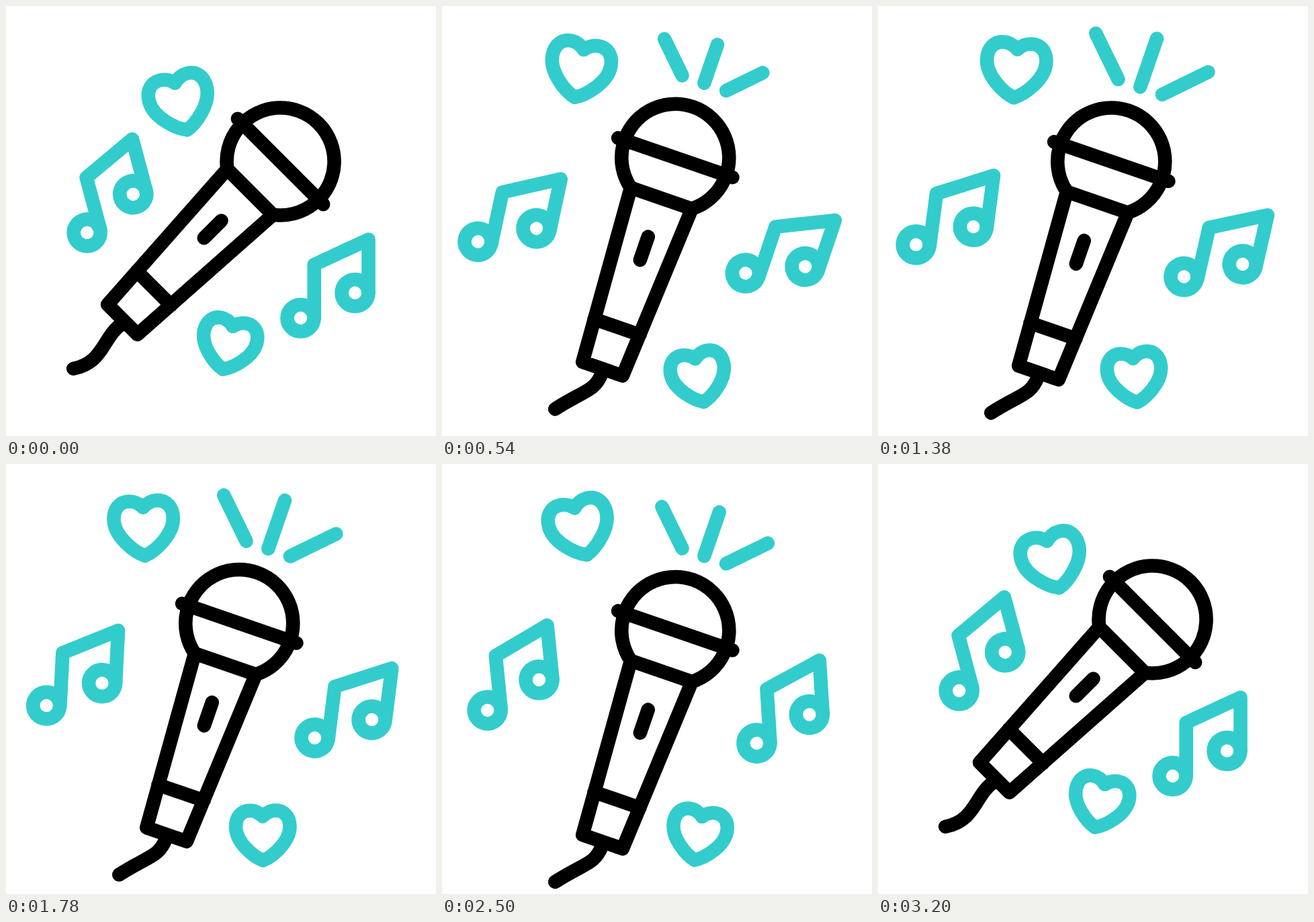
Recreate the animation shown at these times as an HTML page. Size 640 by 640 pixels, loop 3.4 s.

```html
<!DOCTYPE html>
<html lang="en">
<head>
<meta charset="utf-8">
<title>Singing microphone</title>
<style>
html, body { margin: 0; width: 100%; height: 100%; overflow: hidden; background: #fff; }
svg { display: block; width: 100vw; height: 100vh; fill: none; stroke: #3cc; stroke-width: 20.6; stroke-linecap: round; stroke-linejoin: round; }
#heartB { stroke-width: 22.6; }
</style>
</head>
<body>
<svg viewBox="0 0 640 640">
  <defs>
    <g id="note">
      <circle cx="-40.5" cy="48.5" r="20"/>
      <circle cx="40.5" cy="11" r="20"/>
      <path d="M-20.3 48.5V-31L60.5 -68.5V11"/>
    </g>
    <path id="half" d="M0 -31C-7 -38 -15 -40.5 -21 -40.5C-35 -40.5 -44.2 -30 -44.2 -14C-44.2 12 -14 36 0 41"/>
    <g id="heart"><use href="#half"/><use href="#half" transform="scale(-1 1)"/></g>
  </defs>
  <g id="noteL"><use href="#note" x="-8"/></g>
  <g id="noteR"><use href="#note"/></g>
  <g id="heartT"><use href="#heart"/></g>
  <g id="heartB"><use href="#heart" transform="scale(.91)"/></g>
  <g id="mic">
    <g transform="translate(0 -125.2)">
      <path id="rays"/>
      <g stroke="#000">
        <path id="cord"/>
        <path d="M-48 64A80 80 0 1 1 48 64L31.5 332.5H-31.5ZH48M-90 0H90M-36 266.5H36M0 124.5V161"/>
      </g>
    </g>
  </g>
</svg>
<script>
const LOOP = 3400, BEAT = 400, BEATS = 8;
const $ = id => document.getElementById(id);
const mix = (a, b, p) => a + (b - a) * p;
const smooth = x => x * x * (3 - 2 * x);

// Eases through the values that at(0), at(1), at(2)... give
function ease(at, x) {
  const i = Math.floor(x);
  return mix(at(i), at(i + 1), smooth(x - i));
}

// [x, y, angle] at rest, the same while singing, and how far each swings
const parts = {
  noteL: { rest: [155, 278, -15], sing: [111.1, 313.5, 5.2], swing: [0, 0, 16] },
  noteR: { rest: [479, 416, 0], sing: [505.7, 364.6, 10], swing: [0, 0, 20] },
  heartT: { rest: [259.3, 144.6, -14.5], sing: [205.2, 95.4, 1], swing: [0, 0, 23] },
  heartB: { rest: [331.3, 504.2, 13], sing: [382.3, 552.6, -3], swing: [0, 0, -19] },
  mic: { rest: [320, 320, 45], sing: [306.5, 352.7, 19], swing: [0, -20, 0] }
};
const cord = { rest: [4, 337, -3, 371, 26, 397, 0, 436], sing: [1, 339, 0, 368, -15, 371, -47.5, 412] };

const isSinging = i => i > 0 && i < BEATS ? 1 : 0;
const swingAt = i => isSinging(i) * (i % 2 ? 1 : -1);
const reachAt = i => i > 2 && i < 2 * BEATS ? (i % 2 ? 1 : .8) : 0;

function ray(k, length) {
  const a = k * Math.PI / 4;
  return `M${4.5 + 34.6 * k} -119l${length * Math.sin(a)} ${-length * Math.cos(a)}`;
}

function draw(ms) {
  const beat = Math.min(ms / BEAT, BEATS);
  const sing = ease(isSinging, beat), swing = ease(swingAt, beat);
  const blend = part => part.rest.map((v, k) => mix(v, part.sing[k], sing));

  for (const id in parts) {
    const [x, y, a] = blend(parts[id]).map((v, k) => v + swing * parts[id].swing[k]);
    $(id).setAttribute("transform", `translate(${x} ${y}) rotate(${a})`);
  }
  const [x, y, ...curve] = blend(cord);
  $("cord").setAttribute("d", `M${x} ${y}C${curve.join(" ")}`);

  const length = 76.5 * ease(reachAt, beat * 2);
  $("rays").setAttribute("d", length > 0 ? [-1, 0, 1].map(k => ray(k, length)).join("") : "");
}

const start = performance.now();
function tick() {
  draw((performance.now() - start) % LOOP);
  requestAnimationFrame(tick);
}
tick();
</script>
</body>
</html>
```
